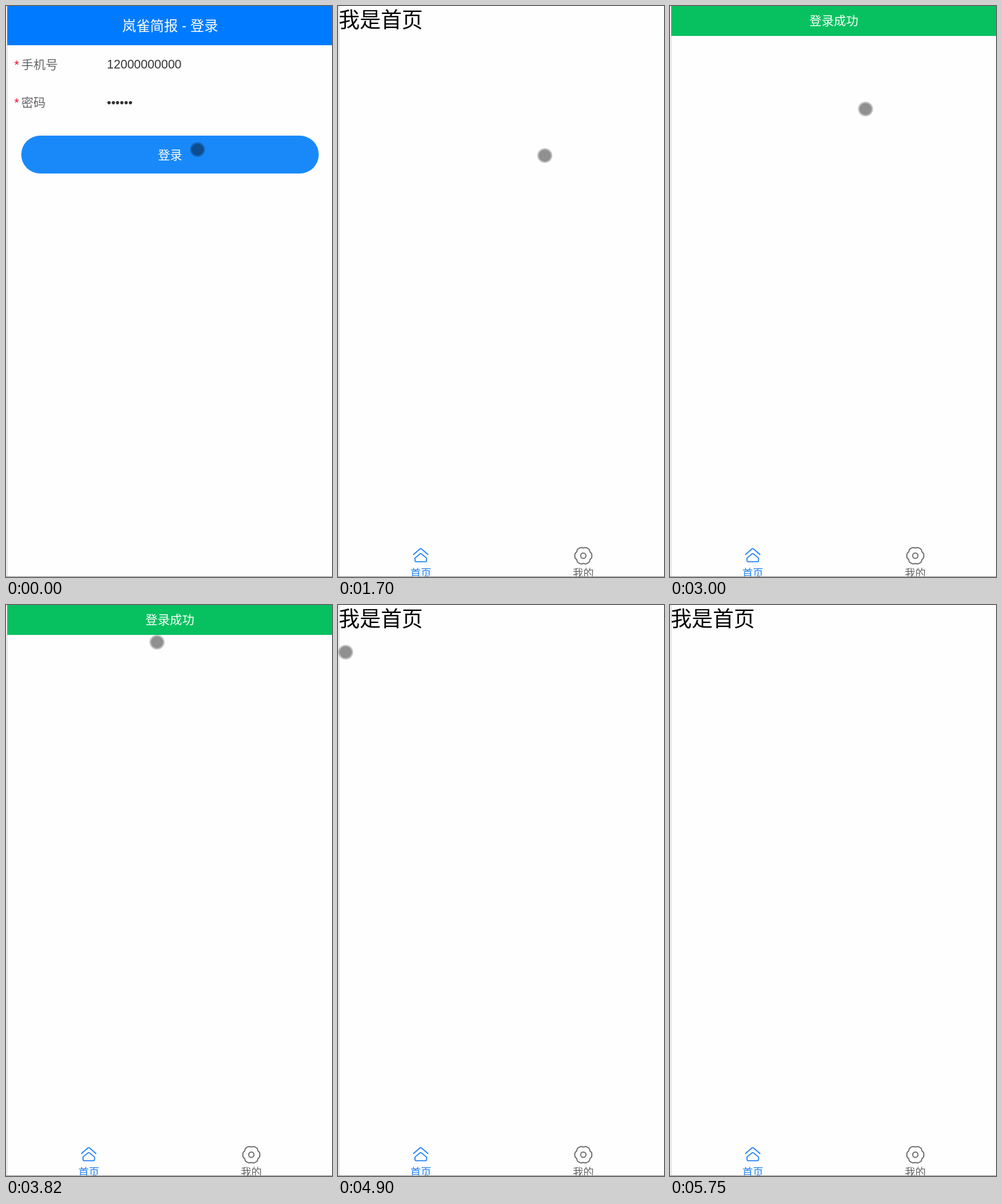
An HTML page for the animation above (6180 ms loop, 491 by 859 pixels).

```html
<!DOCTYPE html>
<html lang="zh-CN">
<head>
<meta charset="utf-8">
<title>登录</title>
<style>
  html, body { margin: 0; width: 100%; height: 100%; overflow: hidden; background: #fefefe; }
  svg { display: block; font: 18.375px "Liberation Sans", "Noto Sans CJK SC", "Noto Sans CJK", sans-serif; }
  .mid { text-anchor: middle; }
  .white { fill: #fff; }
  .label { fill: #646566; }
  .value { fill: #323233; }
  .star { fill: #ee0a24; }
  .active { fill: #1c7ff5; }
  .icon { fill: none; stroke-width: 1.6; stroke-linejoin: round; stroke-linecap: round; }
  .tab { font-size: 15.75px; }
</style>
</head>
<body>
<svg width="491" height="859" viewBox="0 0 491 859">
  <rect width="491" height="859" fill="#fefefe"/>

  <g id="login">
    <rect x="2" width="489" height="59" fill="#007bff"/>
    <text class="mid white" x="247.3" y="36.5" font-size="21">岚雀简报 - 登录</text>
    <text class="star" x="12.5" y="95">*</text>
    <text class="label" x="23" y="94.5">手机号</text>
    <text class="value" x="152" y="94">12000000000</text>
    <text class="star" x="12.5" y="152">*</text>
    <text class="label" x="23" y="151.5">密码</text>
    <text class="value" x="152" y="151.5">••••••</text>
    <rect x="23" y="195" width="448" height="57" rx="28.5" fill="#1989fa"/>
    <text class="mid white" x="247" y="231">登录</text>
  </g>

  <g id="home">
    <text x="1" y="32.3" font-size="31.7">我是首页</text>
    <g class="icon" stroke="#1c7ff5">
      <path d="M113.8 825.2L123.6 816.6Q124.6 815.8 125.6 816.6L135.4 825.2"/>
      <path d="M116 830.5L123.6 824.2Q124.6 823.4 125.6 824.2L133.4 830.5V834.5Q133.4 836 131.9 836H117.5Q116 836 116 834.5Z"/>
    </g>
    <g class="icon" stroke="#646566">
      <path id="gear"/>
      <circle cx="369.5" cy="827" r="4"/>
    </g>
    <text class="mid tab active" x="124.7" y="858.5">首页</text>
    <text class="mid tab label" x="369.5" y="859">我的</text>
    <g id="toast">
      <rect x="2" width="489" height="45" fill="#07c160"/>
      <text class="mid white" x="246.8" y="29">登录成功</text>
    </g>
  </g>

  <rect x="1" width="1" height="859" fill="#d0d0d0"/>
  <rect y="858" width="491" height="1" fill="#a0a0a0"/>

  <g id="cursor">
    <ellipse rx="11.3" ry="11" fill-opacity=".24"/>
    <ellipse rx="9.3" ry="9" fill-opacity=".25"/>
  </g>
</svg>
<script>
  const LOOP = 6180, TICK = 135, TOAST_HEIGHT = 46;
  const [login, home, toast, cursor, gear] =
    ["login", "home", "toast", "cursor", "gear"].map(id => document.getElementById(id));

  // Pointer strokes: Bézier control points, when each is visible and when it moves
  const strokes = [
    { visible: [0, 2880], moving: [280, 580], path: [[288.5, 216], [311.5, 225]] },
    { visible: [2880, 3270], moving: [2880, 3120], path: [[311.5, 225], [290.5, 140.5], [285.5, 114]] },
    { visible: [3550, 3670], moving: [3550, 3550], path: [[125.5, 68]] },
    { visible: [3820, 4490], moving: [3820, 4060], path: [[227.5, 56], [284.5, 62]] },
    { visible: [4490, 5020], moving: [4490, 4900], path: [[263.5, 69], [137.5, 80], [11.5, 71]] },
    { visible: [5300, 5750], moving: [5300, 5600], path: [[224.5, 83], [456, 840], [389.5, 824]] }
  ];

  const show = (el, on) => el.setAttribute("visibility", on ? "visible" : "hidden");
  const move = (el, x, y) => el.setAttribute("transform", `translate(${x} ${y})`);

  // Progress from 0 to 1 in even jumps of about one tick
  function stepped(t, start, end) {
    if (t >= end) return 1;
    if (t <= start) return 0;
    const steps = Math.round((end - start) / TICK);
    return Math.floor(steps * (t - start) / (end - start)) / steps;
  }

  function bezier(points, p) {
    if (points.length === 1) return points[0];
    const next = points.slice(1).map(([x, y], i) => {
      const [px, py] = points[i];
      return [px + (x - px) * p, py + (y - py) * p];
    });
    return bezier(next, p);
  }

  const outline = Array.from({ length: 120 }, (_, i) => {
    const a = i * Math.PI / 60;
    const r = 12.5 + 0.6 * Math.cos(6 * a) - 0.3 * Math.cos(12 * a);
    return `${(369.5 + r * Math.cos(a)).toFixed(2)} ${(827 + r * Math.sin(a)).toFixed(2)}`;
  });
  gear.setAttribute("d", `M${outline.join("L")}Z`);

  function draw() {
    const t = performance.now() % LOOP;
    show(login, t < 1700);
    show(home, t >= 1700);

    const lowered = stepped(t, 1670, 1970) - stepped(t, 4660, 4900);
    move(toast, 0, (lowered - 1) * TOAST_HEIGHT);

    const stroke = strokes.find(({ visible: [from, to] }) => t >= from && t < to);
    show(cursor, stroke);
    if (stroke) move(cursor, ...bezier(stroke.path, stepped(t, ...stroke.moving)));
    requestAnimationFrame(draw);
  }
  draw();
</script>
</body>
</html>
```
